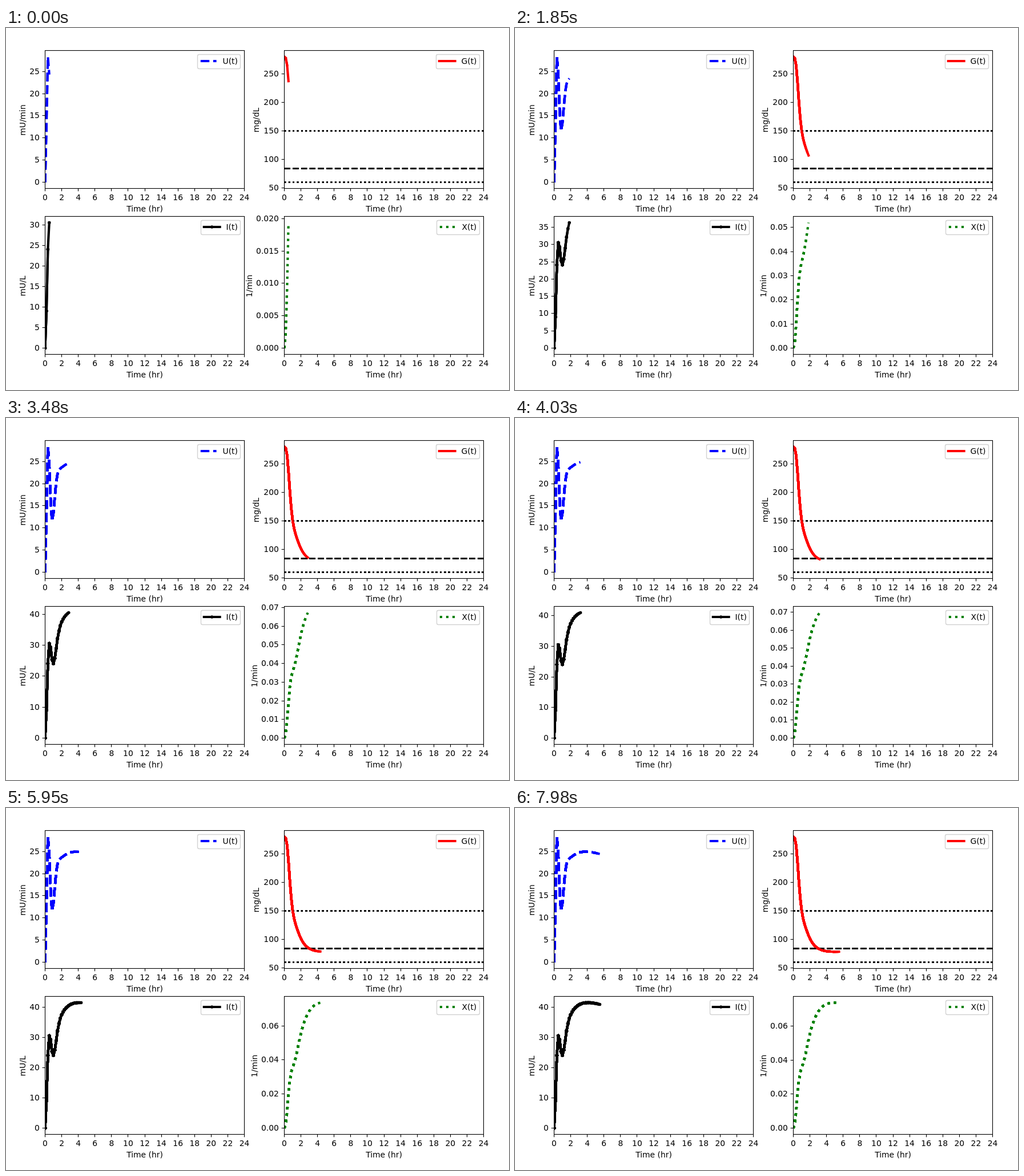
Write an HTML page with a canvas that moves like this. It is 881 by 635 pixels and loops after 8 s.

```html
<!DOCTYPE html>
<html lang="en">
<head>
<meta charset="utf-8">
<title>Glucose control</title>
<style>
  html, body { margin: 0; width: 100%; height: 100%; overflow: hidden; background: #fff; }
  canvas { display: block; }
</style>
</head>
<body>
<canvas id="stage" width="881" height="635"></canvas>
<script>
const ctx = document.getElementById('stage').getContext('2d');
const LOOP = 8000, HOURS = 24, WIDTH = 349, HEIGHT = 242, LINE = 4.17, REF_LINE = 2.78;
const FONT = '13.89px "DejaVu Sans", sans-serif';
const DASHED = [3.7, 1.6], DOTTED = [1, 1.65], SOLID = [];

// Moments at which the next ten-minute sample appears.
const STEPS = [0, 70, 300, 530, 840, 1070, 1300, 1620, 1850, 2150, 2400, 2700, 2930, 3250, 3480, 3800,
  4030, 4340, 4570, 4880, 5110, 5430, 5640, 5950, 6270, 6500, 6820, 7050, 7370, 7670, 7980];

// Insulin infusion rate, one value per ten minutes.
const INFUSION = [0, 13.75, 28.3, 24.3, 16.3, 11.6, 13.3, 17, 20.3, 22.2, 23, 23.4, 23.65, 23.87, 24.1, 24.3,
  24.48, 24.63, 24.74, 24.83, 24.88, 24.9, 24.91, 24.91, 24.9, 24.88, 24.86, 24.82, 24.77, 24.71, 24.65,
  24.58, 24.5, 24.42];

// Minimal model of blood glucose: plasma insulin, remote insulin, glucose.
function simulate() {
  const I = [0], X = [0], G = [280], dt = 0.02;
  let i = 0, x = 0, g = 280;
  for (const u of INFUSION.slice(1)) {
    for (let k = 0; k < 10 / dt; k++) {
      const di = u / 12 - 0.05 * i;
      const dx = 5.08e-5 * i - 0.028344 * x;
      const dg = 0.028735 * (280 - g) - x * g;
      i += di * dt; x += dx * dt; g += dg * dt;
    }
    I.push(i); X.push(x); G.push(g);
  }
  return { I, X, G };
}
const model = simulate();

const PLOTS = [
  { left: 68.5, top: 39.5, data: INFUSION, color: '#00f', dash: DASHED, name: 'U(t)', unit: 'mU/min',
    unitX: () => 34, legendX: 335 },
  { left: 487.5, top: 39.5, data: model.G, color: '#f00', dash: SOLID, name: 'G(t)', unit: 'mg/dL',
    unitX: () => 443, legendX: 753, range: [60, 280],
    refs: [[150, DOTTED], [84, DASHED], [60, DOTTED]] },
  { left: 68.5, top: 330.5, data: model.I, color: '#000', dash: SOLID, name: 'I(t)', unit: 'mU/L',
    unitX: () => 34, legendX: 341, dots: true },
  { left: 487.5, top: 330.5, data: model.X, color: '#008000', dash: DOTTED, name: 'X(t)', unit: '1/min',
    unitX: digits => digits > 2 ? 431 : 440, legendX: 754 }
];

const snap = v => Math.round(v - 0.5) + 0.5;

function text(str, x, y, align = 'center') {
  ctx.fillStyle = '#000';
  ctx.textAlign = align;
  ctx.fillText(str, x, y);
}

function stroke(points, color, width, dash) {
  ctx.strokeStyle = color;
  ctx.lineWidth = width;
  ctx.lineJoin = 'round';
  ctx.lineCap = dash.length ? 'butt' : 'square';
  ctx.setLineDash(dash.map(d => d * width));
  ctx.beginPath();
  points.forEach(([x, y]) => ctx.lineTo(x, y));
  ctx.stroke();
  ctx.setLineDash([]);
}

function dot([x, y]) {
  ctx.fillStyle = '#000';
  ctx.beginPath();
  ctx.arc(x, y, 2.78, 0, 2 * Math.PI);
  ctx.fill();
}

function thinLine(x1, y1, x2, y2) {
  ctx.strokeStyle = '#000';
  ctx.lineWidth = 1.11;
  ctx.lineCap = 'butt';
  ctx.beginPath();
  ctx.moveTo(x1, y1);
  ctx.lineTo(x2, y2);
  ctx.stroke();
}

function niceStep(span) {
  const raw = span / 8, base = 10 ** Math.floor(Math.log10(raw));
  return base * [1, 2, 2.5, 5, 10].find(m => m * base >= raw);
}

function drawAxes(plot, lo, hi, toX, toY) {
  const { left, top } = plot, bottom = top + HEIGHT;
  for (let h = 0; h <= HOURS; h += 2) {
    const x = snap(toX(h));
    thinLine(x, bottom, x, bottom + 4.86);
    text(h, toX(h), bottom + 20.5);
  }
  text('Time (hr)', left + WIDTH / 2, bottom + 40.5);

  const pad = (hi - lo) * 0.05, step = niceStep((hi - lo) * 1.1);
  const digits = Math.max(0, -Math.floor(Math.log10(step) + 1e-9));
  for (let n = Math.ceil((lo - pad) / step); n * step <= hi + pad; n++) {
    const y = snap(toY(n * step));
    thinLine(left - 4.86, y, left, y);
    text((n * step).toFixed(digits), left - 9.7, y + 4.5, 'right');
  }
  ctx.save();
  ctx.translate(plot.unitX(digits), top + HEIGHT / 2 + 1);
  ctx.rotate(-Math.PI / 2);
  text(plot.unit, 0, 0);
  ctx.restore();

  ctx.strokeStyle = '#000';
  ctx.lineWidth = 1.11;
  ctx.lineJoin = 'miter';
  ctx.strokeRect(left, top, WIDTH, HEIGHT);
}

function drawLegend({ left, top, legendX, color, dash, dots, name }) {
  const right = left + WIDTH - 7, y = top + 18.5, x = legendX + 5.8;
  ctx.fillStyle = 'rgba(255,255,255,.8)';
  ctx.strokeStyle = '#d2d2d2';
  ctx.lineWidth = 1.39;
  ctx.beginPath();
  ctx.roundRect(legendX + 0.5, top + 7, right - legendX - 0.5, 25, 2.8);
  ctx.fill();
  ctx.stroke();
  stroke([[x, y], [x + 27.8, y]], color, LINE, dash);
  if (dots) dot([x + 13.9, y]);
  text(name, x + 38.7, top + 23.5, 'left');
}

function drawPlot(plot, count) {
  const { left, top, data, color, dash, refs = [] } = plot;
  const shown = data.slice(0, count);
  const [lo, hi] = plot.range || [0, Math.max(...shown)];
  const toX = h => left + h / HOURS * WIDTH;
  const toY = v => top + HEIGHT - 11 - (v - lo) / (hi - lo) * (HEIGHT - 22);
  const points = shown.map((v, n) => [toX(n / 6), toY(v)]);

  ctx.save();
  ctx.beginPath();
  ctx.rect(left, top, WIDTH, HEIGHT);
  ctx.clip();
  // Every sample adds its lines over the earlier ones, which hardens the edges.
  for (let n = 2; n <= count; n++) {
    for (const [value, pattern] of refs) {
      const y = snap(toY(value));
      stroke([[left, y], [left + WIDTH, y]], '#000', REF_LINE, pattern);
    }
    const part = points.slice(0, n);
    stroke(part, color, LINE, dash);
    if (plot.dots) part.forEach(dot);
  }
  ctx.restore();

  drawAxes(plot, lo, hi, toX, toY);
  drawLegend(plot);
}

let lastCount = 0;
function render() {
  const time = performance.now() % LOOP;
  const count = STEPS.filter(t => t <= time).length + 3;
  if (count !== lastCount) {
    lastCount = count;
    ctx.fillStyle = '#fff';
    ctx.fillRect(0, 0, 881, 635);
    ctx.font = FONT;
    PLOTS.forEach(plot => drawPlot(plot, count));
  }
  requestAnimationFrame(render);
}
render();
</script>
</body>
</html>
```
